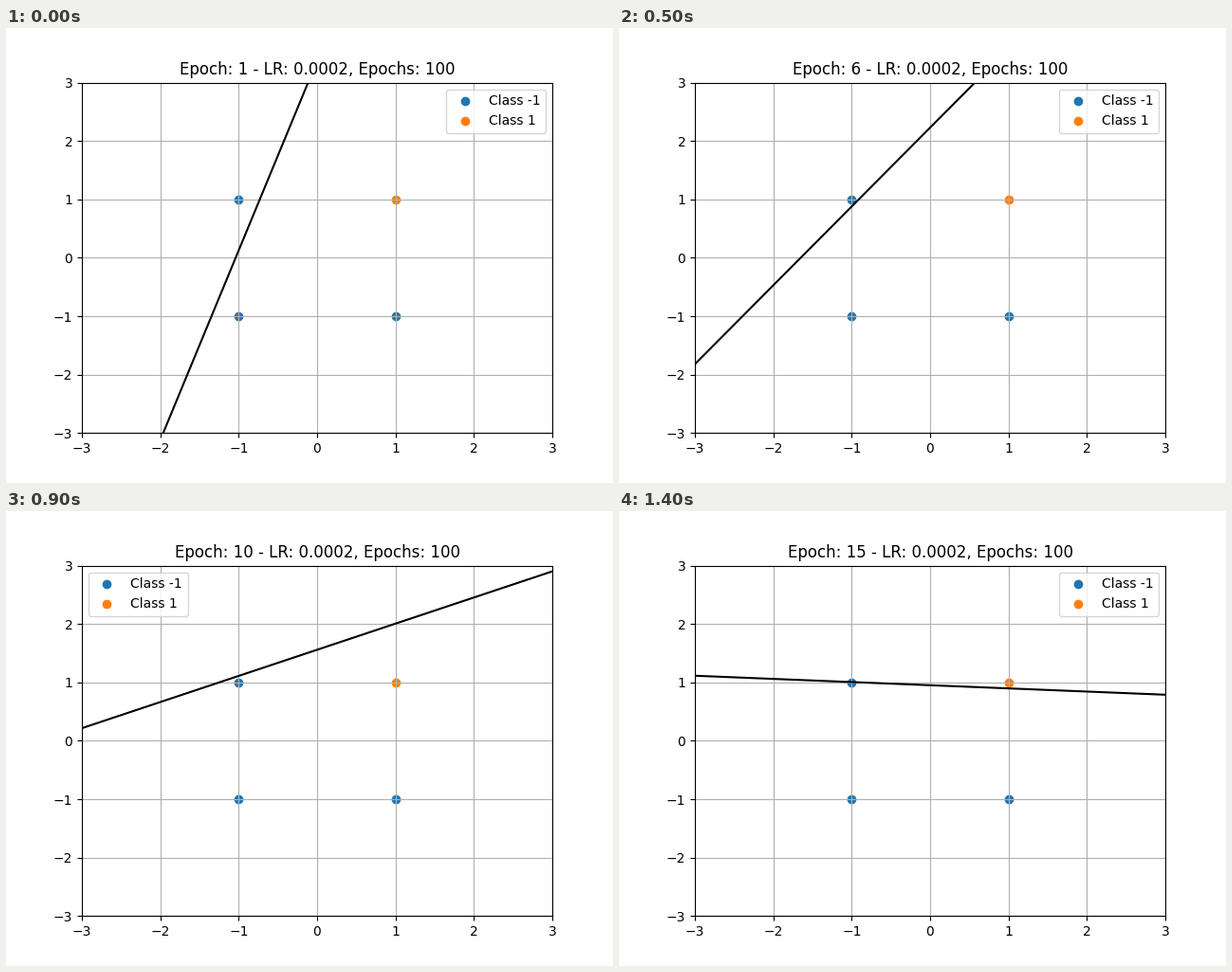
Write a matplotlib script that moves like this. It is 640 by 480 pixels and loops after 1500 ms.

```python
import numpy as np
import matplotlib.pyplot as plt
from matplotlib.animation import FuncAnimation

RATE = 0.0002
MAX_EPOCHS = 100
SHOWN = 15
LIMIT = 3

points = np.array([[-1, -1], [-1, 1], [1, -1], [1, 1]])
labels = np.array([-1, -1, -1, 1])


def train(epochs):
    """Perceptron weights (w1, w2, bias) at the start of each epoch."""
    weights = RATE * np.array([-18.315, 5.64, -19.025])
    history = []
    for _ in range(epochs):
        history.append(weights.copy())
        for point, label in zip(points, labels):
            sample = np.append(point, 1)
            if label * (weights @ sample) <= 0:
                weights += RATE * label * sample
    return history


history = train(SHOWN)
xs = np.array([-LIMIT, LIMIT])

fig, ax = plt.subplots(figsize=(6.4, 4.8), dpi=100)
for label in (-1, 1):
    ax.scatter(*points[labels == label].T, label=f"Class {label}")
boundary, = ax.plot([], [], "k-")
ax.set_xlim(-LIMIT, LIMIT)
ax.set_ylim(-LIMIT, LIMIT)
ax.grid(True)
ax.legend(loc="best")


def update(i):
    w1, w2, bias = history[i]
    boundary.set_data(xs, -(w1 * xs + bias) / w2)
    ax.set_title(f"Epoch: {i + 1} - LR: {RATE}, Epochs: {MAX_EPOCHS}")
    return boundary,


anim = FuncAnimation(fig, update, frames=SHOWN, interval=100, repeat=True)
plt.show()
```
